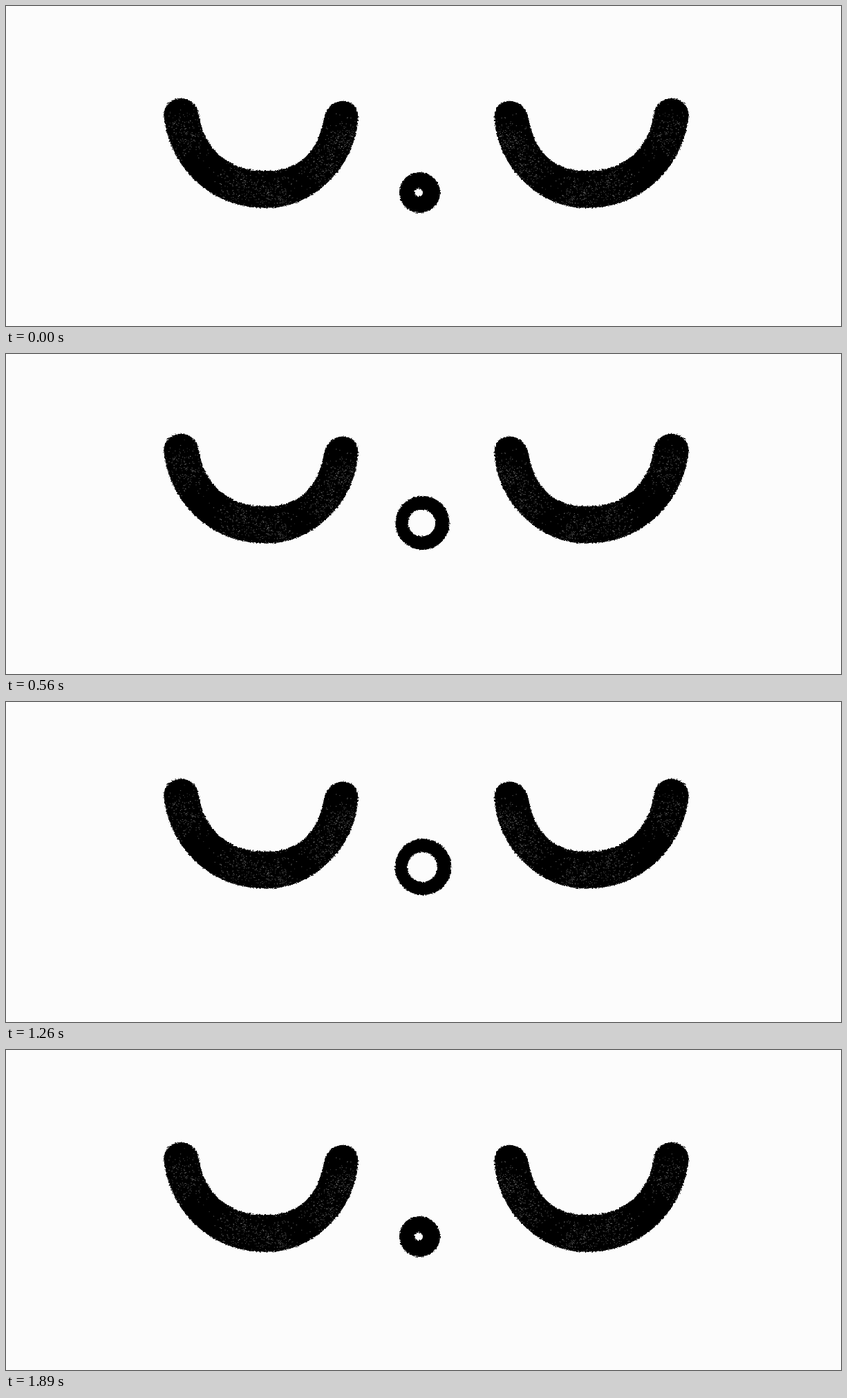
Write an HTML page that moves like this. It is 1208 px wide and 464 px high and loops after 1.96 s.

```html
<!DOCTYPE html>
<html lang="en">
<head>
<meta charset="utf-8">
<title>Sleepy face</title>
<style>
  html, body { margin: 0; width: 100%; height: 100%; overflow: hidden; background: #fcfcfc; }
  svg { display: block; width: 1208px; height: 464px; }
</style>
</head>
<body>
<svg viewBox="0 0 1208 464">
  <defs>
    <filter id="chalk" filterUnits="userSpaceOnUse" x="200" y="90" width="480" height="230" color-interpolation-filters="sRGB">
      <feTurbulence type="fractalNoise" baseFrequency=".4" numOctaves="2" seed="4"/>
      <feDisplacementMap in="SourceGraphic" scale="4" xChannelSelector="R" yChannelSelector="G"/>
      <feGaussianBlur stdDeviation=".5"/>
    </filter>
    <path id="lid" d="M229 160C227 127 274 125 279 156C287 208 322 240 378 239C425 239 453 211 461 160C469 130 510 131 510 160C508 231 446 293 378 293C290 293 236 228 229 160Z"/>
    <clipPath id="inside"><use href="#lid"/></clipPath>
    <g id="eye">
      <use href="#lid" filter="url(#chalk)"/>
      <path id="specks" clip-path="url(#inside)" stroke="#fcfcfc" stroke-opacity=".38"/>
    </g>
  </defs>
  <g id="eyes">
    <use href="#eye"/>
    <use href="#eye" transform="matrix(-1 0 0 1 1217 0)"/>
  </g>
  <g filter="url(#chalk)" fill-rule="evenodd">
    <path id="nose"/>
    <path id="rim" fill="#071204"/>
  </g>
</svg>
<script>
const LOOP = 1960, STEP = 70;
const el = id => document.getElementById(id);

let seed = 7;
const rand = () => (seed = seed * 16807 % 2147483647) / 2147483647;
const bell = () => (rand() + rand() + rand() - 1.5) * 2;

// Worn patches where the chalk lets the paper through
let specks = "";
for (const [x, y] of [[261, 184], [335, 260], [388, 273], [458, 236], [490, 195]])
  for (let i = 0; i < 210; i++)
    specks += `M${(x + bell() * 16).toFixed(1)} ${(y + bell() * 16).toFixed(1)}h${(0.5 + rand()).toFixed(1)}`;
el("specks").setAttribute("d", specks);

const ring = (x, y, r) => `M${x - r} ${y}a${r} ${r} 0 1 0 ${2 * r} 0a${r} ${r} 0 1 0 ${-2 * r} 0Z`;

function ease(t, from, to) {
  const p = Math.min(1, Math.max(0, (t - from) / (to - from)));
  return (1 - Math.cos(Math.PI * p)) / 2;
}

function draw(t) {
  const lift = ease(t, 35, 770) - ease(t, 1230, 1770);
  const breath = (1 - Math.cos(2 * Math.PI * (t + 35) / LOOP)) / 2;
  el("eyes").setAttribute("transform", `translate(-0.5 ${-22.5 * lift})`);

  const y = 270.5 - 31.5 * lift;
  const holeX = 597 + 5.5 * lift, holeR = 6 + 20.5 * breath;
  const outer = ring(598.5 + 5 * lift, y, 29.5 + 16 * breath ** 1.25);
  el("nose").setAttribute("d", outer + ring(holeX, y, holeR));
  // A deep green rim shows around the fullest breath
  el("rim").setAttribute("d", breath > 0.95 ? outer + ring(holeX + 1, y, holeR + 7) : "");
}

function tick() {
  draw(Math.floor(performance.now() % LOOP / STEP) * STEP);
  requestAnimationFrame(tick);
}
tick();
</script>
</body>
</html>
```
